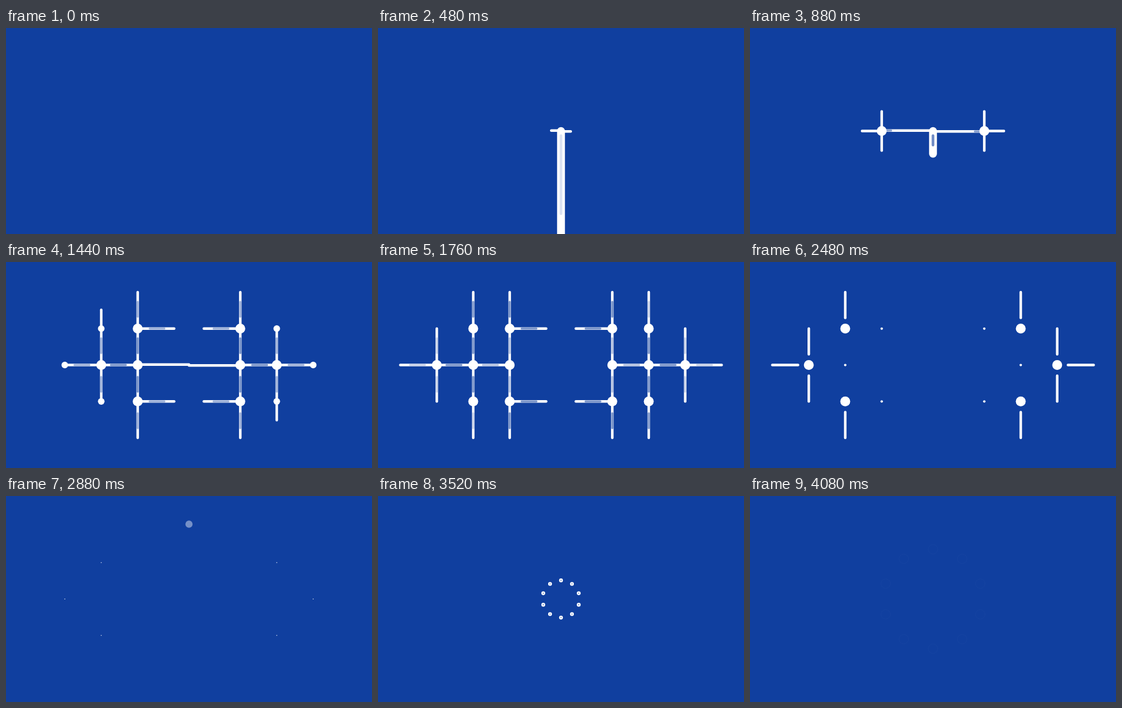
Write an HTML page with a canvas that moves like this. It is 630 px wide and 355 px high and loops after 4120 ms.

```html
<!DOCTYPE html>
<html lang="en">
<head>
<meta charset="utf-8">
<title>Branching network</title>
<style>
  html, body { margin: 0; width: 100%; height: 100%; overflow: hidden; background: #103f9f; }
  canvas { display: block; width: 630px; height: 355px; }
</style>
</head>
<body>
<canvas id="stage" width="630" height="355"></canvas>
<script>
const ctx = document.getElementById('stage').getContext('2d');
const LOOP = 4120, TICK = 80;
const BLUE = '#103f9f', WHITE = '#fff';
const CX = 315, CY = 177.5, ARM = 88.3, STEP = 62.75, GROW = 260;
const UP = [0, -1], DOWN = [0, 1], OUT = [1, 0], IN = [-1, 0];

const clamp = v => Math.max(0, Math.min(1, v));
const span = (t, start, length) => clamp((t - start) / length);
const easeInOut = u => u < .5 ? 2 * u * u : 1 - 2 * (1 - u) ** 2;
const easeOut = u => 1 - (1 - u) ** 2;
const ease = (t, start, length = GROW) => easeInOut(span(t, start, length));

// Each node sits at col, row steps from the end of the arm.
const nodes = [];
const branches = [];

function addNode(col, row, grow, shrink, erase, dirs) {
  for (const side of [-1, 1]) {
    const x = CX + side * (ARM + col * STEP), y = CY + row * STEP;
    nodes.push({ x, y, grow, shrink });
    for (const [dx, dy] of dirs) {
      // One outer branch on each side runs ahead of the others.
      const early = col === 1 && row !== 0 && row === side;
      const start = early ? 1308 : grow + (col + Math.abs(row) > 1 ? 30 : 0);
      branches.push({ x, y, dx: dx * side, dy, start, erase });
    }
  }
}

addNode(0, 0, 745, 1990, 1720, [UP, DOWN, OUT]);
addNode(1, 0, 1110, 2300, 2030, [UP, DOWN, OUT]);
addNode(0, -1, 1110, 2300, 2030, [UP, IN]);
addNode(0, 1, 1110, 2300, 2030, [DOWN, IN]);
addNode(1, -1, 1460, 2660, 2380, [UP]);
addNode(1, 1, 1460, 2660, 2380, [DOWN]);
addNode(2, 0, 1460, 2660, 2380, [UP, DOWN, OUT]);

function line(x1, y1, x2, y2, width, color = WHITE, alpha = 1) {
  ctx.globalAlpha = alpha;
  ctx.strokeStyle = color;
  ctx.lineWidth = width;
  ctx.lineCap = 'round';
  ctx.beginPath();
  ctx.moveTo(x1, y1);
  ctx.lineTo(x2, y2);
  ctx.stroke();
  ctx.globalAlpha = 1;
}

function dot(x, y, r, alpha = 1) {
  if (r <= 0) return;
  ctx.globalAlpha = alpha;
  ctx.fillStyle = WHITE;
  ctx.beginPath();
  ctx.arc(x, y, r, 0, Math.PI * 2);
  ctx.fill();
  ctx.globalAlpha = 1;
}

function drawBranch(b, t) {
  const head = ease(t, b.start) * STEP, tail = ease(t, b.erase) * STEP;
  if (head - tail < .01) return;
  const at = d => [b.x + b.dx * d, b.y + b.dy * d];
  line(...at(tail), ...at(head), 4.4);
  const glow = .4 * span(t, b.start + 230, 70) + .15 * span(t, b.start + 330, 150);
  const alpha = glow * (1 - span(t, b.erase, 90));
  if (alpha > 0) line(...at(20.5), ...at(46), 3.6, BLUE, alpha);
}

function drawArms(t) {
  const head = ease(t, 400) * ARM, tail = ease(t, 1500) * ARM;
  if (head - tail < .01) return;
  for (const side of [-1, 1]) {
    const y = CY + side * .7;
    line(CX + side * tail, y, CX + side * head, y, 4.4);
    const from = 6 + 66 * ease(t, 640, 240), to = 6 + 74 * ease(t, 600, GROW);
    if (t > 600 && t < 960) line(CX + side * from, y, CX + side * to, y, 3.6, BLUE, .5 * (1 - span(t, 880, 80)));
  }
}

function drawStem(t) {
  if (t < 80 || t >= 1150) return;
  const top = 362 - 184.5 * ease(t, 60, 340);
  const bottom = 362 - 184.5 * ease(t, 640, 356);
  line(CX, top, CX, bottom, 13.5 * (1 - span(t, 996, 150)));
  const end = Math.min(bottom - 15, 320);
  const alpha = .6 * span(t, 440, 160);
  if (alpha > 0 && end > 185.5) line(CX, 185.5, CX, end, 4.6, BLUE, alpha);
}

function drawBall(t) {
  if (t < 2640 || t >= 3340) return;
  dot(CX, CY * ease(t, 2610, 730), 6.2, clamp(1.15 * span(t, 2610, 730)));
}

function drawBurst(t) {
  if (t < 3340) return;
  const radius = 88 * easeOut(span(t, 3340, 887));
  const size = radius * .1 + .1;
  const width = Math.min(size, 2.5 - 1.5 * span(t, 3560, 480));
  ctx.strokeStyle = WHITE;
  ctx.lineWidth = width;
  ctx.globalAlpha = 1 - span(t, 3640, 450);
  for (let i = 0; i < 10; i++) {
    const a = i * Math.PI / 5 - Math.PI / 2;
    ctx.beginPath();
    ctx.arc(CX + radius * Math.cos(a), CY + radius * Math.sin(a), size - width / 2, 0, Math.PI * 2);
    ctx.stroke();
  }
  ctx.globalAlpha = 1;
}

function draw(t) {
  ctx.fillStyle = BLUE;
  ctx.fillRect(0, 0, 630, 355);
  drawArms(t);
  drawStem(t);
  for (const b of branches) drawBranch(b, t);
  for (const n of nodes) {
    dot(n.x, n.y, 8.5 * span(t, n.grow - 120, 150) * (1 - span(t, n.shrink, 240)));
  }
  drawBall(t);
  drawBurst(t);
}

const begin = performance.now();
function frame() {
  const t = (performance.now() - begin) % LOOP;
  draw(Math.floor(t / TICK) * TICK);
  requestAnimationFrame(frame);
}
frame();
</script>
</body>
</html>
```
